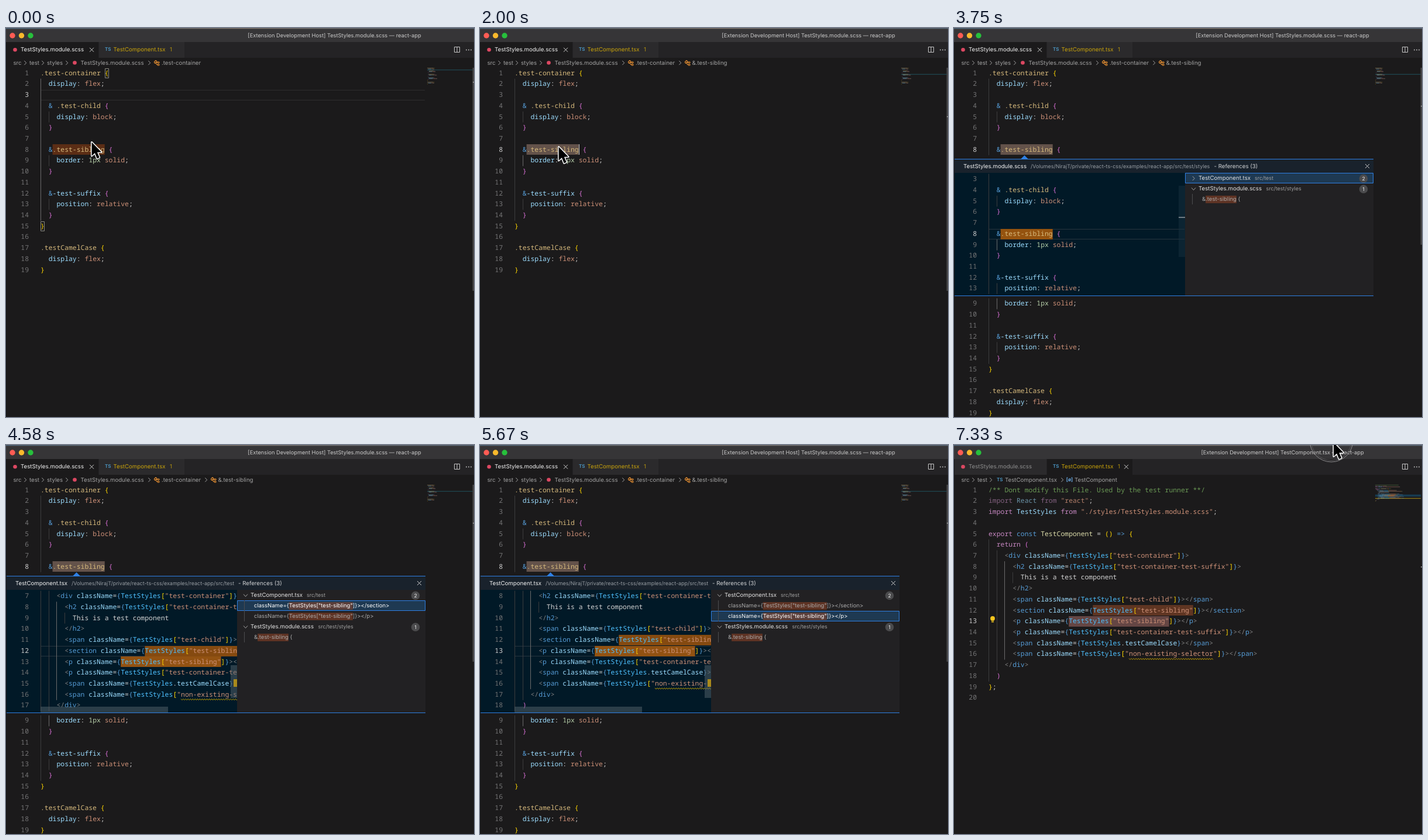
An HTML page with a canvas that plays this animation: 800x666 px, repeating every 7.41 s.

```html
<!DOCTYPE html>
<html lang="en">
<head>
<meta charset="utf-8">
<title>Find references</title>
<style>
html, body { margin: 0; width: 100%; height: 100%; overflow: hidden; background: #1b1a1b; }
canvas { display: block; width: 800px; height: 666px; }
</style>
</head>
<body>
<canvas id="stage" width="800" height="666"></canvas>
<script>
const ctx = document.getElementById('stage').getContext('2d');
const LOOP = 7410, ROW = 18.72, CH = 6.858, LEFT = 59;
const CODE = '500 11.43px "Noto Sans Mono", monospace';
const ui = (size, weight = 400) => `${weight} ${size}px Inter, sans-serif`;
const UI = ui(9.7), SMALL = ui(8.95), BG = '#1b1a1b', BLUE = '#2f80e4';

const INK = {
  s: '#d7ba7d', p: '#9cdcfe', v: '#ce9178', n: '#b5cea8', w: '#d4d4d4', y: '#ffd700', m: '#da70d6',
  b: '#569cd6', k: '#c586c0', g: '#808080', t: '#4fc1ff', f: '#dcdcaa', c: '#6a9955',
  K: '#82607f', P: '#6b93a8', V: '#b27e69'
};

// "~x" switches the ink
const rule = (name, value) => `~p${name}~w: ${value}~w;`;
const scss = [
  '~s.test-container ~y{', '  ' + rule('display', '~vflex'), '',
  '  ~b& ~s.test-child ~m{', '    ' + rule('display', '~vblock'), '  ~m}', '',
  '  ~b&~s.test-sibling ~m{', '    ' + rule('border', '~n1px ~vsolid'), '  ~m}', '',
  '  ~b&~p-test-suffix ~m{', '    ' + rule('position', '~vrelative'), '  ~m}', '~y}', '',
  '~s.testCamelCase ~y{', '  ' + rule('display', '~vflex'), '~y}'
];
const end = tag => `~g</~b${tag}~g>`;
const open = (tag, expr) => `~g<~b${tag} ~pclassName~w=~b{~tTestStyles${expr}~b}~g>`;
const key = name => `~y[~v"${name}"~y]`;
const elem = (tag, expr) => '      ' + open(tag, expr) + end(tag);
const tsx = [
  '~c/** Dont modify this File. Used by the test runner **/',
  '~Kimport ~PReact ~Kfrom ~V"react"~w;',
  '~kimport ~pTestStyles ~kfrom ~v"./styles/TestStyles.module.scss"~w;', '',
  '~kexport ~bconst ~fTestComponent ~w= ~y() ~b=> ~y{', '  ~kreturn ~m(',
  '    ' + open('div', key('test-container')),
  '      ' + open('h2', key('test-container-test-suffix')),
  '        ~wThis is a test component', '      ' + end('h2'),
  elem('span', key('test-child')), elem('section', key('test-sibling')),
  elem('p', key('test-sibling')), elem('p', key('test-container-test-suffix')),
  elem('span', '~w.~ptestCamelCase'), elem('span', key('non-existing-selector')),
  '    ' + end('div'), '  ~m)', '~y}~w;', ''
];

const parse = lines => lines.map(line => {
  let col = 0;
  return line.split('~').map((part, i) => {
    const text = i ? part.slice(1) : part;
    const token = { text, col, ink: i ? INK[part[0]] : INK.w };
    col += text.length;
    return token;
  }).filter(token => token.text.trim());
});

// guides: [column, first row, last row, lit]
const docs = {
  scss: { lines: parse(scss), guides: [[0, 2, 14], [2, 5, 5], [2, 9, 9], [2, 13, 13]] },
  tsx: { lines: parse(tsx), guides: [[0, 6, 18], [2, 7, 17], [4, 8, 16, 1], [6, 9, 9]] }
};

function rect(x, y, w, h, fill) { ctx.fillStyle = fill; ctx.fillRect(x, y, w, h); }
function frame(x, y, w, h, color) {
  ctx.strokeStyle = color; ctx.lineWidth = 1; ctx.strokeRect(x + .5, y + .5, w - 1, h - 1);
}
function dot(x, y, r, fill) { ctx.fillStyle = fill; ctx.beginPath(); ctx.arc(x, y, r, 0, 7); ctx.fill(); }
function path(points, color, width = 1, fill) {
  ctx.beginPath();
  points.forEach(([x, y]) => ctx.lineTo(x, y));
  if (fill) { ctx.closePath(); ctx.fillStyle = fill; }
  ctx.strokeStyle = color; ctx.lineWidth = width; ctx.lineJoin = 'round';
  if (width) ctx.stroke();
  if (fill) ctx.fill();
}
function label(text, x, y, color, font = UI, align = 'left') {
  ctx.font = font; ctx.fillStyle = color; ctx.textAlign = align;
  ctx.fillText(text, x, y);
}
const chevron = (x, y, down) => path(
  down ? [[x - 3.5, y - 2], [x, y + 2], [x + 3.5, y - 2]] : [[x - 1.7, y - 3.5], [x + 1.7, y], [x - 1.7, y + 3.5]], '#a5a5a5');
const cross = (x, y) => {
  path([[x - 3.5, y - 3.5], [x + 3.5, y + 3.5]], '#d0d0d0');
  path([[x - 3.5, y + 3.5], [x + 3.5, y - 3.5]], '#d0d0d0');
};

const colX = col => LEFT + col * CH;
const rowY = row => 77.4 + (row - 1) * ROW;
const rowTop = y => Math.round(y - 9);

function mark(row, col, len, color, y) { rect(colX(col), rowTop(y(row)), len * CH, 18, color); }
function currentLine(y, width, color) {
  rect(LEFT, rowTop(y), width, 1, color);
  rect(LEFT, rowTop(y) + 17, width, 1, color);
}

function squiggle(row, y) {
  const pts = [];
  for (let x = colX(35); x <= colX(56); x += 1) pts.push([x, y(row) + 8.2 + Math.sin(x * 1.55) * 1.1]);
  path(pts, '#cca700', .9);
}

function codeRows(doc, from, to, active, y, lit) {
  doc.guides.forEach(([col, a, b, on]) => {
    const first = Math.max(a, from), last = Math.min(b, to);
    if (first > last) return;
    const bright = on || lit && lit[0] === col && lit[1] === a;
    rect(Math.round(colX(col)), y(first) - 9.4, 1, (last - first + 1) * ROW, bright ? '#6b6a6b' : '#3c3c3d');
  });
  for (let row = from; row <= to; row++) {
    label(row, 39, y(row), row === active ? '#cfcfcf' : '#747475', CODE, 'right');
    doc.lines[row - 1].forEach(t => label(t.text, colX(t.col), y(row), t.ink, CODE));
  }
  if (doc === docs.tsx && to >= 16) squiggle(16, y);
}

function minimap(name, active) {
  const y = row => 68.3 + (row - 1) * 1.5;
  if (name === 'tsx') {
    rect(720, y(12), 78, 3.6, '#173b50');
    rect(737, y(12), 18, 1.5, '#70431f');
    rect(734, y(13), 18, 1.5, '#70431f');
    rect(720, y(16), 78, 1.3, '#8d7617');
  } else rect(720, y(active), 78, 1, '#20505c');
  ctx.globalAlpha = .5;
  docs[name].lines.forEach((line, i) => line.forEach(t =>
    rect(720 + t.col * .74, y(i + 1), t.text.trim().length * .74, .9, t.ink)));
  ctx.globalAlpha = 1;
}

function tag(x, y) {
  const c = '#e89033';
  path([[x - 4.5, y - 1], [x - 1.5, y - 4], [x + .5, y - 2], [x - 2.5, y + 1], [x - 4.5, y - 1]], c, 1.1);
  path([[x - 1, y - .5], [x + 2, y - .5]], c);
  path([[x - .5, y - .5], [x - .5, y + 3], [x + 2, y + 3]], c);
  frame(x + 1, y - 2, 4, 3, c);
  frame(x + 1, y + 2, 4, 3, c);
}
const styleIcon = (x, y) => dot(x, y, 3.3, '#dc4862');
const tsIcon = (x, y) => label('TS', x, y, '#4d9ccb', ui(8, 600));

function chrome(name, picked) {
  const isTsx = name === 'tsx';
  rect(0, 0, 800, 24, '#363537');
  const desk = ctx.createLinearGradient(0, 0, 800, 0);
  desk.addColorStop(0, '#41627c');
  desk.addColorStop(.5, '#86796c');
  desk.addColorStop(1, '#52667a');
  rect(0, 0, 800, 1, desk);
  rect(0, 1, 800, 1, '#4c4b4e');
  ['#fe5c54', '#f8b92c', '#27c03c'].forEach((c, i) => dot(11 + i * 15.5, 13, 4.7, c));
  const file = isTsx ? 'TestComponent.tsx' : 'TestStyles.module.scss';
  label(`[Extension Development Host] ${file} — react-app`, 561.5, 13.2, '#cbcbcb', ui(9.27), 'center');

  rect(0, 24, 800, 27, '#242325');
  rect(0, 24, 158, 27, isTsx ? '#2b2a2c' : BG);
  rect(159, 24, 146, 27, isTsx ? BG : '#2b2a2c');
  styleIcon(15.5, 37.3);
  label('TestStyles.module.scss', 25, 37.5, isTsx ? '#8e8e8e' : '#f2f2f2');
  tsIcon(169, 37);
  label('TestComponent.tsx', 183.5, 37.5, '#c9a30b');
  label('1', 280, 37.5, '#b3920f');
  cross(isTsx ? 294.5 : 146.5, 37.3);
  frame(766, 32, 10, 10, '#c5c5c5');
  rect(770.5, 32, 1, 10, '#c5c5c5');
  for (let i = 0; i < 3; i++) dot(787 + i * 4, 37.5, .9, '#c5c5c5');

  const crumb = (text, x) => label(text, x, 59.8, '#a3a3a3');
  crumb('src', 12.5); chevron(33, 59.7);
  crumb('test', 40); chevron(63, 59.7);
  if (isTsx) {
    tsIcon(73, 59.5); crumb('TestComponent.tsx', 87); chevron(185, 59.7);
    label('[ø]', 197.5, 59.3, '#6fb7f5', ui(8.5, 600), 'center');
    crumb('TestComponent', 206);
  } else {
    crumb('styles', 70); chevron(104, 59.7);
    styleIcon(117.5, 59.5); crumb('TestStyles.module.scss', 127.5); chevron(245, 59.7);
    tag(257.5, 59.5); crumb('.test-container', 266);
    if (picked) { chevron(342, 59.7); tag(354.5, 59.5); crumb('&.test-sibling', 362.5); }
  }
}

function listRow(i, selected, draw) {
  const y = 257.5 + i * 18;
  if (selected) {
    rect(395, y - 9.5, 322, 18, '#1e3952');
    frame(395, y - 9.5, 322, 18, BLUE);
  }
  draw(y, selected);
}
const group = (file, dir, dirX, count, isOpen) => y => {
  chevron(409.5, y, isOpen);
  label(file, 418, y, '#e4e4e4');
  label(dir, dirX, y + .3, '#a0a0a0', SMALL);
  dot(700, y + .3, 7.3, '#4b4b4d');
  label(count, 700, y + .5, '#f0f0f0', ui(8.6), 'center');
};
const hit = (before, match, after) => (y, selected) => {
  const ink = selected ? '#ffffff' : '#a9a9a9', font = ui(9.5);
  ctx.font = font;
  const x = 424 + ctx.measureText(before).width, w = ctx.measureText(match).width;
  rect(x, y - 6.5, w, 13, selected ? '#5b3f3b' : '#5e3324');
  rect(407, y - 9.5, 1, 18, '#4c4c4e');
  label(before, 424, y, ink, font);
  label(match, x, y, ink, font);
  label(after, x + w, y, ink, font);
};

function peek(t) {
  const expanded = t >= 4080;
  const name = t >= 4330 ? 'tsx' : 'scss', isTsx = name === 'tsx';
  const active = !isTsx ? 8 : t < 4910 ? 12 : 13;
  const selected = t < 3330 ? 2 : t < 3580 ? 1 : t < 4330 ? 0 : t < 4910 ? 1 : 2;
  const y = row => 352.6 + (row - active) * ROW;

  path([[114, 224.5], [120.5, 218], [127, 224.5]], BLUE, 0, BLUE);
  rect(0, 224, 717, 235, BLUE);
  rect(0, 225, 717, 23, '#19222c');
  const dir = '/Volumes/NirajT/private/react-ts-css/examples/react-app/src/test' + (isTsx ? '' : '/styles');
  label(isTsx ? 'TestComponent.tsx' : 'TestStyles.module.scss', 16, 236.7, '#f4f4f4');
  label(dir, isTsx ? 112 : 131, 237, '#979da3', SMALL);
  label('- References (3)', isTsx ? 397 : 444.5, 236.7, '#d0d2d4');
  cross(706.5, 236.5);

  ctx.save();
  ctx.beginPath(); ctx.rect(0, 248, 395, 210); ctx.clip();
  rect(0, 248, 395, 210, '#011927');
  currentLine(y(active), 335, '#28353e');
  if (isTsx) {
    mark(12, 26, 25, '#854a10', y);
    mark(13, 20, 25, '#925212', y);
  } else mark(8, 3, 13, '#95530f', y);
  codeRows(docs[name], active - 5, Math.min(active + 5, 20), active, y, [2, 9]);
  ctx.globalAlpha = .5;
  if (isTsx) {
    rect(384, 377, 11, 56, '#56646d');
    rect(59, 448, 218, 10, '#56646d');
  } else rect(384, 270, 11, 122, '#19303e');
  ctx.globalAlpha = 1;
  if (isTsx) rect(389, 401, 6, 13, '#a98a1c');
  else rect(384, 323.5, 11, 1.6, '#89929a');
  ctx.restore();

  rect(395, 248, 322, 210, '#222123');
  const items = [
    group('TestComponent.tsx', 'src/test', 514, 2, expanded),
    group('TestStyles.module.scss', 'src/test/styles', 533.5, 1, true),
    hit('&', '.test-sibling', ' {')
  ];
  if (expanded) {
    const use = tagName => hit('className={', 'TestStyles["test-sibling"', `]}></${tagName}>`);
    items.splice(1, 0, use('section'), use('p'));
  }
  items.forEach((draw, i) => listRow(i, i === selected, draw));
}

function bulb(x, y) {
  dot(x, y - 1, 3.9, '#f7c51e');
  rect(x - 2, y + 2, 4, 3.5, '#f7c51e');
  rect(x - 2, y + 3, 4, .8, BG);
}

function arrow(x, y) {
  path([[0, 0], [0, 23.5], [5.4, 18.6], [9.2, 28], [13.2, 26.2], [9.4, 17.2], [16.5, 17]]
    .map(([a, b]) => [x + a, y + b]), '#fff', 3, '#000');
}
function beam(x, y) {
  const curves = () => {
    ctx.beginPath();
    for (const s of [-1, 1]) {
      ctx.moveTo(x - 6, y + s * 13);
      ctx.quadraticCurveTo(x, y + s * 13, x, y + s * 9);
      ctx.quadraticCurveTo(x, y + s * 13, x + 6, y + s * 13);
    }
    ctx.moveTo(x, y - 10); ctx.lineTo(x, y + 10);
    ctx.moveTo(x - 3.5, y + 4); ctx.lineTo(x + 3.5, y + 4);
    ctx.stroke();
  };
  ctx.lineCap = 'round';
  ctx.strokeStyle = '#fff'; ctx.lineWidth = 4; curves();
  ctx.strokeStyle = '#000'; ctx.lineWidth = 1.7; curves();
  ctx.lineCap = 'butt';
}

// time, x, y
const early = [[0, 146.5, 195.5], [330, 134.5, 203.5], [2500, 134.5, 203.5]];
const late = [[6000, 134, 203], [6330, 283, 116], [6660, 300, 105], [7250, 649, -4], [LOOP, 649, -4]];
function along(keys, t) {
  const i = Math.max(1, keys.findIndex(k => k[0] >= t));
  const [a, b] = [keys[i - 1], keys[i]];
  const u = (t - a[0]) / (b[0] - a[0]), e = u * u * (3 - 2 * u);
  return [a[1] + (b[1] - a[1]) * e, a[2] + (b[2] - a[2]) * e];
}

function pointer(t) {
  if (t < 2500) arrow(...along(early, t));
  else if (t >= 6080) {
    const [x, y] = along(late, t);
    if (t >= 7240) {
      ctx.lineWidth = 1;
      [['#8d8c8e', 37], ['#555456', 34.5]].forEach(([c, r]) => {
        ctx.strokeStyle = c; ctx.beginPath(); ctx.arc(x - 4, y - 4, r, 0, 7); ctx.stroke();
      });
    }
    if (y > 68) beam(x, y); else arrow(x, y);
  }
}

function styleEditor(t) {
  const picked = t >= 410, peeking = t >= 2500, active = picked ? 8 : 3;
  if (!picked) currentLine(rowY(3), 657, '#2e2d2e');
  mark(8, 3, 13, picked ? '#63524a' : '#5b2d15', rowY);
  const lit = picked ? [2, 9] : [0, 2];
  if (peeking) {
    codeRows(docs.scss, 1, 8, active, rowY, lit);
    codeRows(docs.scss, 9, 19, active, row => rowY(row) + 245, lit);
    peek(t);
  } else {
    codeRows(docs.scss, 1, 19, active, rowY, lit);
    if (picked) rect(169, rowTop(rowY(8)), 1, 18, '#c8c8c8');
    else {
      frame(169, 69, 7, 17, '#8a8a80');
      frame(59, 331, 7, 17, '#8a8a80');
    }
  }
  minimap('scss', active);
  rect(797.5, 68, 2.5, peeking ? 303 : 382, '#454446');
  rect(798, peeking ? 133 : picked ? 151 : 92, 2, 1.5, '#9a9a9a');
}

function componentEditor(t) {
  mark(12, 26, 25, '#5f3522', rowY);
  mark(13, 20, 25, '#654644', rowY);
  codeRows(docs.tsx, 1, 20, 13, rowY);
  bulb(66, 298);
  minimap('tsx');
  if (t < 6900) rect(797.5, 68, 2.5, 375, '#454446');
  rect(798, 208, 2, 1.5, '#9a9a9a');
}

function draw(now) {
  // twelve steps a second
  const t = Math.floor(((now % LOOP) + 6.7) * .012) / .012;
  const name = t < 5740 ? 'scss' : 'tsx';
  ctx.textBaseline = 'middle';
  ctx.textRendering = 'geometricPrecision';
  rect(0, 0, 800, 666, BG);
  chrome(name, t >= 410);
  if (name === 'scss') styleEditor(t); else componentEditor(t);
  rect(0, 24, 1, 642, '#111112');
  pointer(t);
}

const start = performance.now();
function tick() {
  draw(performance.now() - start);
  requestAnimationFrame(tick);
}
tick();
</script>
</body>
</html>
```
